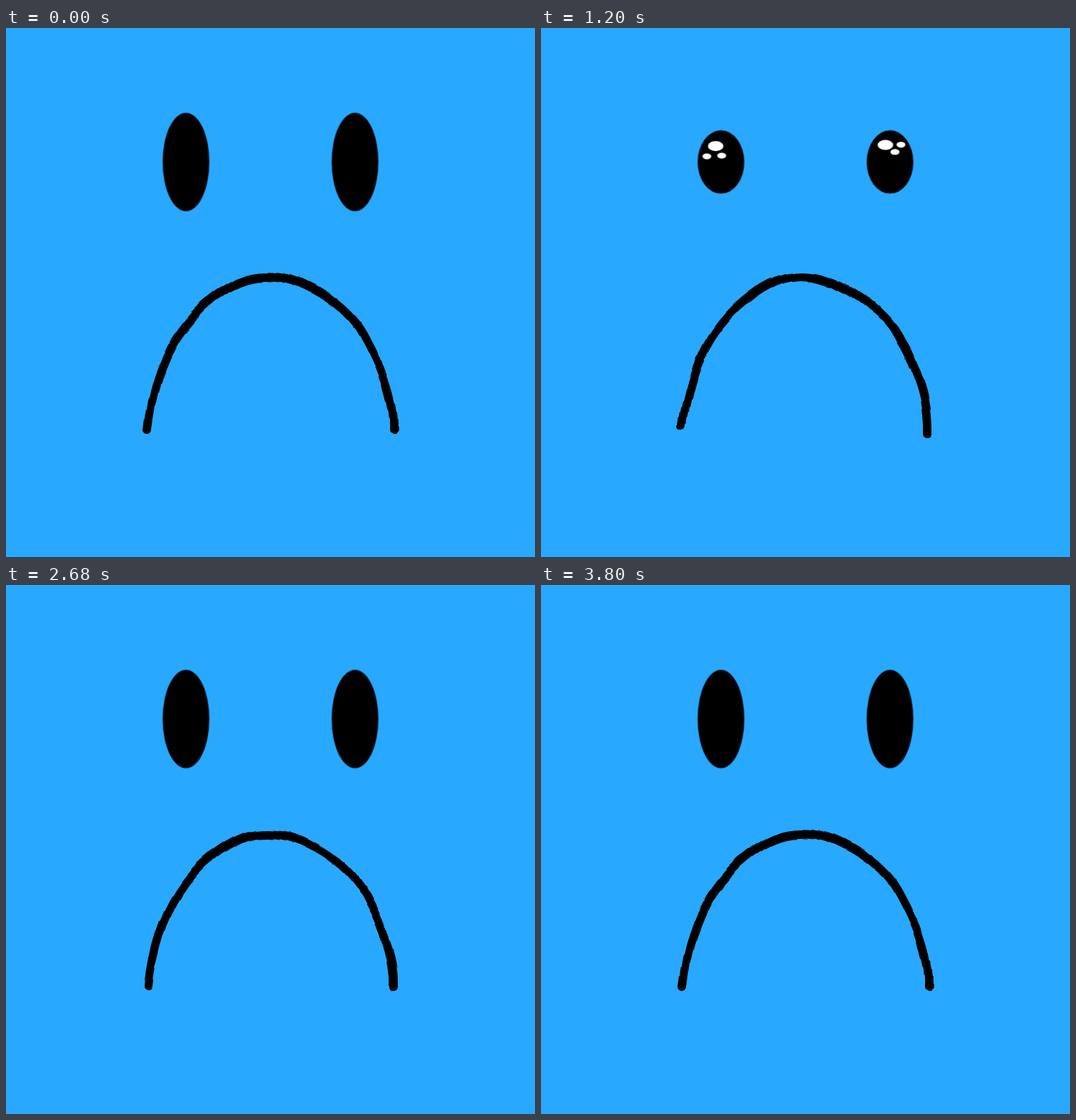
An HTML page without scripts for the animation above (3840 ms loop, 748x748 px).

```html
<!DOCTYPE html>
<html lang="en">
<head>
<meta charset="utf-8">
<title>Sad face</title>
<style>
  html, body { margin: 0; width: 100%; height: 100%; overflow: hidden; background: #28a8ff; }
  svg { display: block; width: 100%; height: 100%; }

  .blink { animation: blink 3840ms linear infinite; }
  .glints { fill: #fff; animation: shine 3840ms infinite; }
  .mouth { fill: none; stroke: #000; stroke-width: 12; stroke-linecap: round; filter: url(#wobble); }

  @keyframes blink {
    0%, 30%, 36.5%, 100% { transform: none; }
    33.3% { transform: scaleY(.08); }
  }

  /* Glints grow out of the pupil and vanish with the blink. */
  @keyframes shine {
    0%, 1% { transform: scale(0); animation-timing-function: ease-out; }
    16.7% { transform: none; animation-timing-function: step-end; }
    33.3%, 100% { transform: scale(0); }
  }
</style>
</head>
<body>
<svg viewBox="0 0 748 748">
  <defs>
    <ellipse id="pupil" rx="33" ry="69.5"/>
    <circle id="big" r="11"/>
    <circle id="small" r="6.3"/>

    <!-- Each whole seed redraws the line: 48 times per loop, every 80 ms. -->
    <filter id="wobble" filterUnits="userSpaceOnUse" x="180" y="330" width="390" height="260"
            color-interpolation-filters="sRGB">
      <feTurbulence type="fractalNoise" baseFrequency=".015" result="noise">
        <animate attributeName="seed" from="1" to="49" begin="-40ms" dur="3840ms" repeatCount="indefinite"/>
      </feTurbulence>
      <feDisplacementMap in="SourceGraphic" in2="noise" scale="16" xChannelSelector="R" yChannelSelector="G"/>
      <feGaussianBlur stdDeviation=".5"/>
    </filter>
  </defs>

  <g transform="translate(254.5 189.5)">
    <g class="blink">
      <use href="#pupil"/>
      <g class="glints">
        <use href="#big" x="-7.5" y="-35"/>
        <use href="#small" x="-20" y="-12.5"/>
        <use href="#small" x="1" y="-14"/>
      </g>
    </g>
  </g>
  <g transform="translate(493.5 189.5)">
    <g class="blink">
      <use href="#pupil"/>
      <g class="glints">
        <use href="#big" x="-6.5" y="-37.5"/>
        <use href="#small" x="15.5" y="-38"/>
        <use href="#small" x="7" y="-22"/>
      </g>
    </g>
  </g>

  <path class="mouth" d="M201 566C206 522 218 475 242 437S318 350 368 350 482 392 504 432 549 520 547 572"/>
</svg>
</body>
</html>
```
